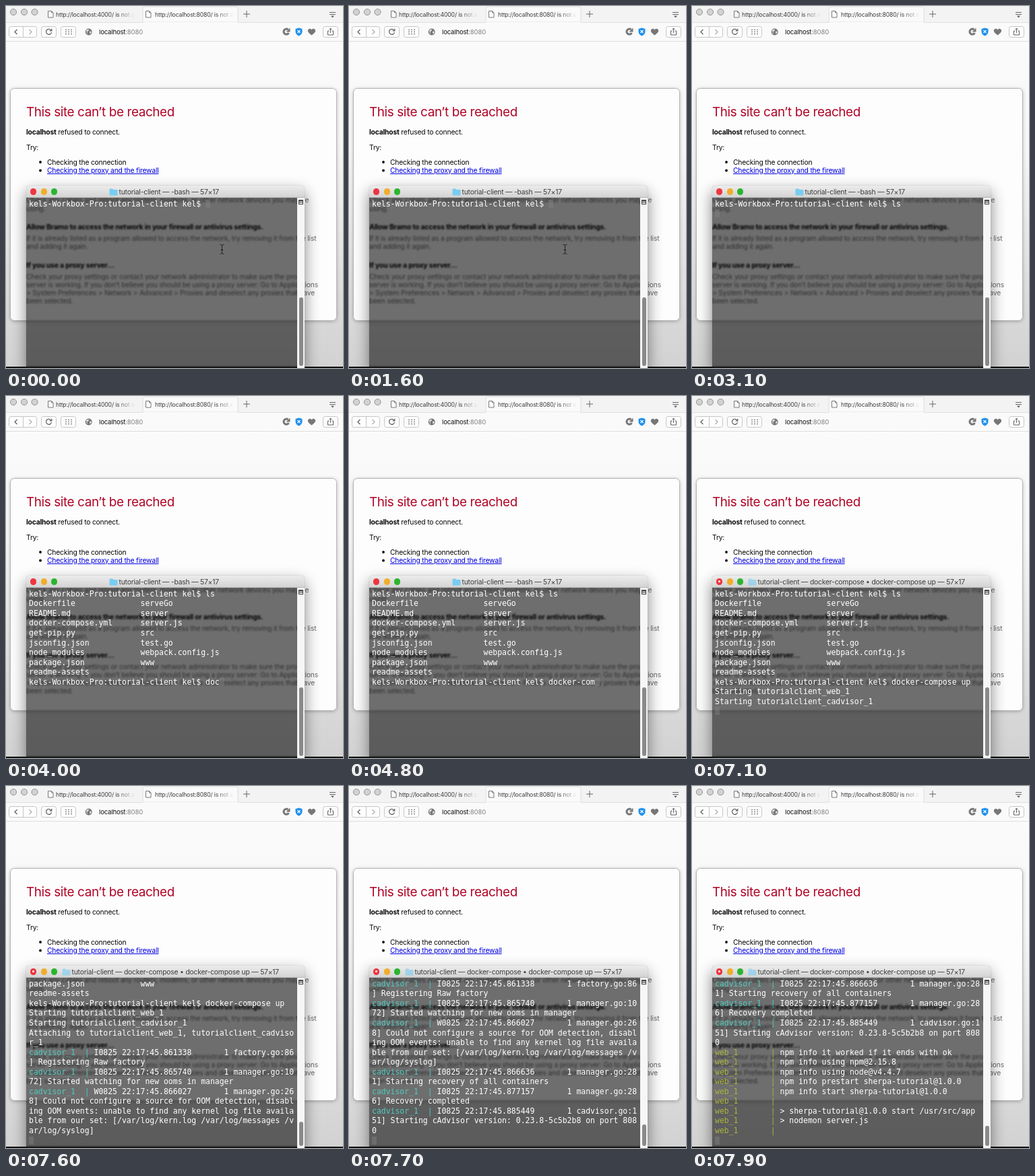
An HTML page that plays this animation: 500 px wide and 538 px high, repeating every 8 s.

```html
<!DOCTYPE html>
<html lang="en">
<head>
<meta charset="utf-8">
<title>Terminal session</title>
<style>
html, body { margin: 0; width: 100%; height: 100%; overflow: hidden; background: #fff; }
#stage { position: relative; width: 500px; height: 538px; overflow: hidden; }
#page { position: absolute; left: 0; top: 0; }
#page text, #title { font-family: Inter, Roboto, sans-serif; letter-spacing: -.02em; }
.bold { font-weight: 700; }
.help { fill: #6a6a6a; }
#term { position: absolute; left: 30px; top: 267px; width: 413px; height: 271px;
  border-radius: 5px 5px 0 0; box-shadow: 0 9px 22px rgba(0,0,0,.48), 0 0 1px rgba(0,0,0,.5); }
#bar { position: absolute; left: 0; top: 0; width: 413px; height: 18px; border-radius: 5px 5px 0 0;
  background: linear-gradient(#ececec, #d3d3d3); border-bottom: 1px solid #b4b4b4; box-sizing: border-box; }
.light { position: absolute; top: 4.2px; width: 9.4px; height: 9.4px; border-radius: 50%; }
#busy { position: absolute; left: 3.2px; top: 3.2px; width: 3px; height: 3px; border-radius: 50%; background: #fff; }
#folder { position: absolute; top: 4px; }
#title { position: absolute; top: 0; line-height: 18px; font-size: 10.35px; color: #3c3c3c; white-space: pre; }
#body { position: absolute; left: 0; top: 18px; width: 402px; height: 253px; overflow: hidden;
  background: rgba(0,0,0,.565); backdrop-filter: blur(.9px); }
#text { position: absolute; left: 4px; top: 1.8px; margin: 0; color: #fff; white-space: pre;
  font: 11.46px/14.56px "DejaVu Sans Mono", "Noto Sans Mono", monospace; }
#text .row { height: 14.56px; }
.cadvisor { color: #4fc9be; }
.web { color: #abb23c; }
.caret { display: inline-block; width: 6.9px; height: 12px; vertical-align: -2px; background: rgba(130,130,130,.45); }
#scroll { position: absolute; left: 402px; top: 18px; width: 11px; height: 253px; background: #f6f6f6; }
#thumb { position: absolute; left: 2.5px; width: 6px; border-radius: 3px; background: #8a8a8a; }
#split { position: absolute; left: 2px; top: 2.5px; width: 7px; height: 7px; box-sizing: border-box;
  border: 1px solid #444; background: linear-gradient(#444 1px, #ddd 1px 2px, #444 2px 3px, #ddd 3px); }
#over { position: absolute; left: 0; top: 0; }
</style>
</head>
<body>
<div id="stage">
<svg id="page" width="500" height="538" viewBox="0 0 500 538">
  <defs>
    <linearGradient id="sky" x2="0" y2="1">
      <stop stop-color="#fcfcfc"/><stop offset=".4" stop-color="#f6f6f6"/>
      <stop offset=".87" stop-color="#d8d8d8"/><stop offset="1" stop-color="#d2d2d2"/>
    </linearGradient>
    <linearGradient id="fade"><stop offset=".78" stop-color="#3a3a3a"/><stop offset="1" stop-color="#3a3a3a" stop-opacity="0"/></linearGradient>
    <filter id="soft" x="-5%" y="-5%" width="110%" height="112%"><feDropShadow dx="0" dy="1" stdDeviation="2.5" flood-opacity=".25"/></filter>
    <g id="doc" fill="#fff" stroke="#777"><path d="M.5 .5h5l2.500 2.500v7h-7.500z"/><path d="M5.500 .5v2.500h2.500" fill="none"/></g>
  </defs>

  <rect width="500" height="538" fill="url(#sky)"/>
  <rect y="536" width="500" height="2" fill="#0c0c0c"/>

  <!-- tab strip and toolbar -->
  <rect width="500" height="24" fill="#f3f3f3"/>
  <path d="M203 24V4q0-3 3-3H341q3 0 3 3V24z" fill="#fafafa" stroke="#dedede"/>
  <rect y="24" width="500" height="29" fill="#fafafa"/>
  <path d="M0 52.500H500" stroke="#dedede"/>
  <path d="M0 24.500H203M344 24.500H500" stroke="#e0e0e0"/>
  <g fill="#d2d2d2" stroke="#8d8d8d" stroke-width=".9">
    <circle cx="11" cy="9" r="4.600"/><circle cx="27" cy="9" r="4.600"/><circle cx="42.500" cy="9" r="4.600"/>
  </g>
  <use href="#doc" x="62" y="7"/><use href="#doc" x="207" y="7"/>
  <g font-size="8.7" fill="url(#fade)">
    <text x="74" y="15.500">http://localhost:4000/ is not a</text>
    <text x="221" y="15.500">http://localhost:8080/ is not a</text>
  </g>
  <path d="M352 12H362M357 7V17" stroke="#666"/>
  <path d="M480 9.500H489M480 12.500H489" stroke="#666"/><path d="M482 14.500h5l-2.500 3z" fill="#666"/>

  <g fill="#fdfdfd" stroke="#c6c6c6">
    <rect x="4.500" y="30.500" width="41" height="16" rx="3"/>
    <rect x="52.500" y="30.500" width="22" height="16" rx="3"/>
    <rect x="81.500" y="30.500" width="22" height="16" rx="3"/>
    <rect x="470.500" y="30.500" width="22" height="16" rx="3"/>
    <path d="M25.500 31V46"/>
  </g>
  <g fill="none" stroke="#5c5c5c" stroke-width="1.200">
    <path d="M16.500 35l-3.500 3.500 3.500 3.500"/>
    <path d="M34.500 35l3.500 3.500-3.500 3.500" stroke="#aaa"/>
    <path d="M67 36.200A4 4 0 1 0 67.500 39"/><path d="M67.800 33.800v3h-3"/>
    <path d="M88 35.500h10M88 38.500h10M88 41.500h10" stroke-dasharray="2 2"/>
    <path d="M479.500 37h-2v6h8v-6h-2M481.500 40v-7M479.500 35l2-2 2 2" stroke-width="1"/>
  </g>
  <circle cx="122.700" cy="38.500" r="5" fill="#777"/>
  <path d="M119 36.500q2-2.500 4-1.500l-1 2.500-2 .5 1 2.500-1 1zM124 38l2.500-.5v2.500l-2 1.500z" fill="#e8e8e8"/>
  <text x="138" y="42" font-size="9.6" fill="#111">localhost<tspan fill="#808080">:8080</tspan></text>
  <path d="M418.500 35A4 4 0 1 0 419.500 40" fill="none" stroke="#777" stroke-width="3"/>
  <path d="M421.500 32.500v6h-6z" fill="#777"/>
  <path d="M434.500 32.500l5 1.500v4q0 4-5 6.500q-5-2.500-5-6.500v-4z" fill="#1e90ee"/>
  <path d="M432.500 36l4 4M436.500 36l-4 4" stroke="#fff" stroke-width="1.200"/>
  <path d="M453.500 43.500C448 39.500 447.500 37.500 448 35.800C449 33 452.500 33 453.500 35.600C454.500 33 458 33 459 35.800C459.500 37.500 459 39.500 453.500 43.500z" fill="#777"/>

  <!-- error card -->
  <rect x="6.500" y="122.500" width="484" height="345" rx="6" fill="#fdfdfd" stroke="#b4b4b4" filter="url(#soft)"/>
  <text x="30" y="163.700" font-size="18.85" fill="#b00426">This site can’t be reached</text>
  <g font-size="10.35" fill="#080808">
    <text x="30" y="191"><tspan class="bold">localhost</tspan> refused to connect.</text>
    <text x="30" y="213.500">Try:</text>
    <circle cx="51" cy="232" r="1.900"/><circle cx="51" cy="244.500" r="1.900"/>
    <text x="61" y="235.500">Checking the connection</text>
    <text x="61" y="247.800" fill="#0000e0" text-decoration="underline">Checking the proxy and the firewall</text>
    <g class="help">
      <text x="30" y="292.300">Check any cables and reboot any routers, modems, or other network devices you may be</text>
      <text x="30" y="304.500">using.</text>
      <text x="30" y="348.700">If it is already listed as a program allowed to access the network, try removing it from the list</text>
      <text x="30" y="360.900">and adding it again.</text>
      <text x="30" y="405.500">Check your proxy settings or contact your network administrator to make sure the proxy</text>
      <text x="30" y="417.700">server is working. If you don’t believe you should be using a proxy server: Go to Applications</text>
      <text x="30" y="429.900">&gt; System Preferences &gt; Network &gt; Advanced &gt; Proxies and deselect any proxies that have</text>
      <text x="30" y="442.100">been selected.</text>
    </g>
    <g class="bold" font-size="10.5">
      <text x="30" y="331.800">Allow Bramo to access the network in your firewall or antivirus settings.</text>
      <text x="30" y="388.500">If you use a proxy server…</text>
    </g>
  </g>
</svg>

<div id="term">
  <div id="body"><div id="text"></div></div>
  <div id="scroll"><div id="split"></div><div id="thumb"></div></div>
  <div id="bar">
    <div class="light" style="left:6.100px;background:#ee3540"><div id="busy"></div></div>
    <div class="light" style="left:21.600px;background:#f0ae2c"></div>
    <div class="light" style="left:36.900px;background:#2bb52f"></div>
    <svg id="folder" width="13" height="11"><path d="M.5 2q0-1.500 1.500-1.500h3l1.500 1.500h4.500q1.500 0 1.500 1.500v5.500q0 1.500-1.500 1.500h-9q-1.500 0-1.500-1.500z" fill="#78cdf2"/></svg>
    <div id="title"></div>
  </div>
</div>

<svg id="over" width="500" height="538">
  <path id="beam" d="M317.500 354.500q3 0 3 2v10q0 2-3 2M323.500 354.500q-3 0-3 2v10q0 2 3 2M318.500 362.500h4" fill="none" stroke="#222"/>
</svg>
</div>

<script>
const LOOP = 8000, COLS = 57, ROWS = 17;
const PROMPT = "kels-Workbox-Pro:tutorial-client kel$ ";
const $ = id => document.getElementById(id);

const files = [
  ["Dockerfile", "serveGo"], ["README.md", "server"], ["docker-compose.yml", "server.js"],
  ["get-pip.py", "src"], ["jsconfig.json", "test.go"], ["node_modules", "webpack.config.js"],
  ["package.json", "www"], ["readme-assets", ""]
].map(([a, b]) => a.padEnd(24) + b + "\n").join("");

const log = (level, frac, msg) => `cadvisor_1  | ${level}0825 22:17:45.${frac}       1 ${msg}\n`;
const web = msg => `web_1       | ${msg}\n`;

// Each entry adds its text at the given time.
const output = [[0, PROMPT]];
const add = (time, text) => output.push([time, text]);
const type = (time, text, gap = 100) => [...text].forEach((c, i) => add(time + i * gap, c));

type(2700, "ls");
add(3100, "\n");
add(3200, files + PROMPT);
type(3800, "docker");
type(4500, "-compose ");
type(5800, "up", 150);
add(6300, "\n");
add(6600, "Starting tutorialclient_web_1\n");
add(6900, "Starting tutorialclient_cadvisor_1\n");
add(7500, "Attaching to tutorialclient_web_1, tutorialclient_cadvisor_1\n");
add(7600,
  log("I", "861338", "factory.go:86] Registering Raw factory") +
  log("I", "865740", "manager.go:1072] Started watching for new ooms in manager") +
  log("W", "866027", "manager.go:268] Could not configure a source for OOM detection, disabling OOM events: " +
    "unable to find any kernel log file available from our set: [/var/log/kern.log /var/log/messages /var/log/syslog]"));
add(7700,
  log("I", "866636", "manager.go:281] Starting recovery of all containers") +
  log("I", "877157", "manager.go:286] Recovery completed") +
  log("I", "885449", "cadvisor.go:151] Starting cAdvisor version: 0.23.8-5c5b2b8 on port 8080"));
add(7800, ["it worked if it ends with ok", "using npm@2.15.8", "using node@v4.4.7"]
  .map(s => web("npm info " + s)).join(""));
add(7900, ["npm info prestart sherpa-tutorial@1.0.0", "npm info start sherpa-tutorial@1.0.0", "",
  "> sherpa-tutorial@1.0.0 start /usr/src/app", "> nodemon server.js", ""].map(web).join(""));

const thumbTops = [[0, 433], [7600, 499], [7700, 503], [7800, 504], [7900, 505]];
const titles = [
  [0, "tutorial-client — -bash — 57×17", 123],
  [6300, "tutorial-client — docker-compose • docker-compose up — 57×17", 53]
];
const at = (table, t) => table.filter(e => e[0] <= t).pop();

const wrap = line => line.match(new RegExp(`.{1,${COLS}}`, "g")) || [""];
const escape = s => s.replace(/&/g, "&amp;").replace(/</g, "&lt;").replace(/>/g, "&gt;");
const paint = row => escape(row).replace(/^(cadvisor|web)_1 +\|/, '<span class="$1">$&</span>');

function draw(t) {
  const text = output.filter(e => e[0] <= t).map(e => e[1]).join("");
  const rows = text.split("\n").flatMap(wrap).slice(-ROWS).map(paint);
  rows[rows.length - 1] += '<span class="caret"></span>';
  $("text").innerHTML = rows.map(r => `<div class="row">${r}</div>`).join("");

  const top = at(thumbTops, t)[1];
  $("thumb").style.top = top - 285 + "px";
  $("thumb").style.height = 535 - top + "px";

  const [start, title, x] = at(titles, t);
  $("title").textContent = title;
  $("folder").style.left = x + "px";
  $("folder").style.opacity = start ? .6 : 1;
  $("title").style.left = x + 14.5 + "px";
  $("busy").style.display = start ? "block" : "none";
  $("beam").style.display = t < 2600 ? "block" : "none";
}

let shown = -1;
const begin = performance.now();
function tick() {
  const t = (performance.now() - begin) % LOOP;
  const step = Math.floor(t / 50) * 50;
  if (step !== shown) draw(shown = step);
  requestAnimationFrame(tick);
}
tick();
</script>
</body>
</html>
```
